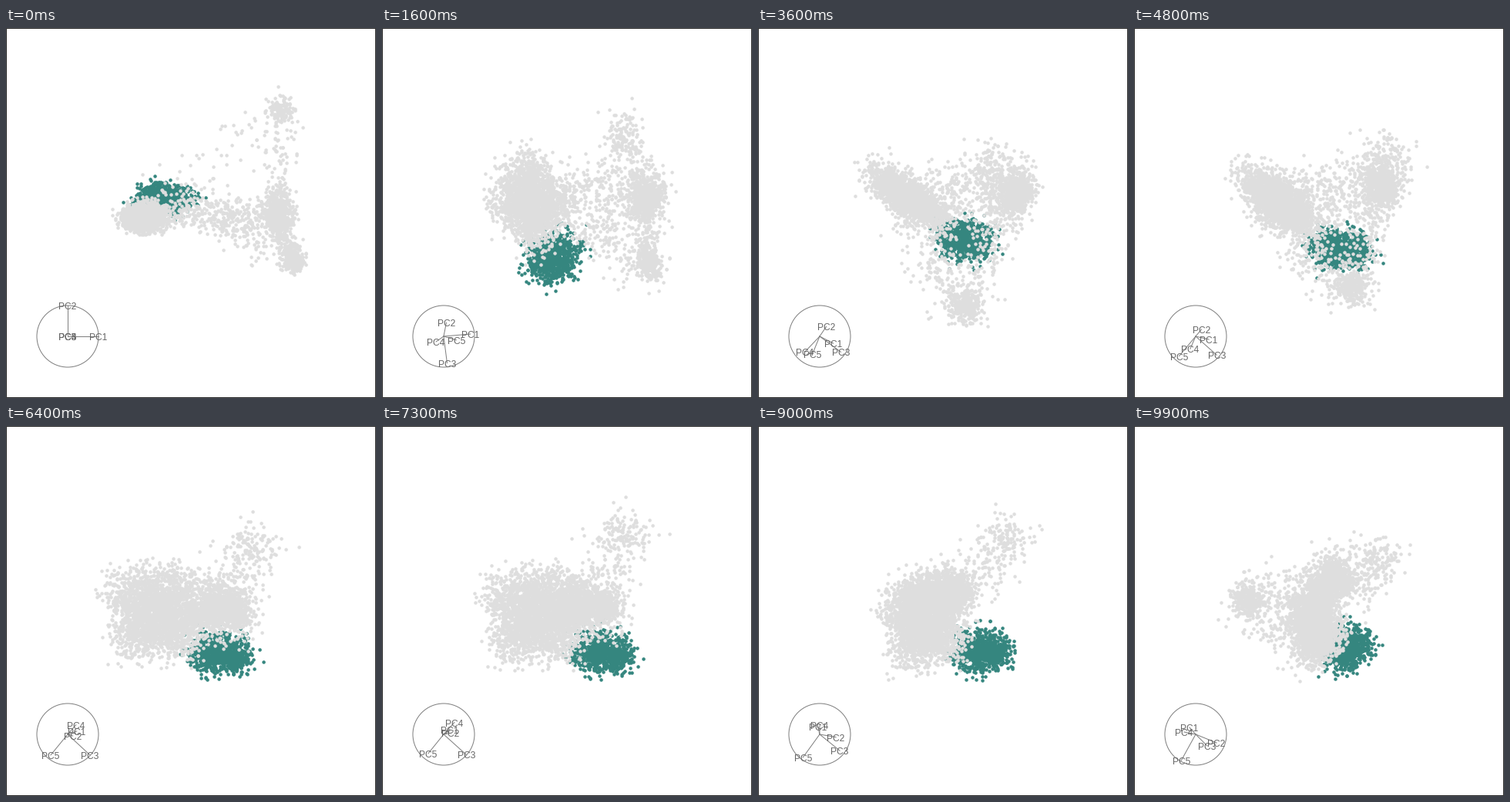
Animation, 480 px wide and 480 px high, one loop 10000 ms. Source, as a matplotlib script:

```python
import matplotlib.pyplot as plt
import numpy as np
from matplotlib.animation import FuncAnimation
from matplotlib.patches import Circle, Rectangle

SIZE, DPI = 480, 96
PX = 72 / DPI
FRAMES, INTERVAL = 100, 100
CENTER = np.array([240, 240])
HUB, RADIUS = np.array([80, 400]), 40
TEAL, PALE, LINE, INK = "#35867f", "#dedede", "#7f7f7f", "#666666"

# The tour pauses for one frame whenever it reaches a target plane.
HOLDS = np.array([15, 31, 43, 57, 74, 92])

# Tour step -> tips of the first four axes in the dial, as complex pixels.
TOUR = {
    0: (40, 40j, 0, 0),
    15: (35 + 3j, 3.5 + 18j, 4.5 - 35j, -10 - 7j),
    29: (18 - 11j, 9 + 14j, 27 - 18.5j, -24 - 22j),
    34: (17.5 - 9j, 8.5 + 12.5j, 27 - 20j, -19 - 20j),
    45: (17 - 4j, 7.5 + 9j, 27 - 24j, -7 - 16j),
    60: (11.5 + 4j, 6.5 - 2j, 28 - 26j, 10.5 + 12j),
    77: (4 + 8j, 11 + 5j, 29.5 - 26j, 16 + 18j),
    93: (-8 + 9j, 27 - 11j, 15 - 15j, -15 + 3j),
}

rng = np.random.default_rng(7)


def orthonormal(m):
    u, _, vt = np.linalg.svd(m, full_matrices=False)
    return u @ vt


def plane(tips):
    """Basis from four tips; the squares of all five must sum to zero."""
    z = np.array(tips, complex)
    last = np.sqrt(-np.sum(z ** 2))
    z = np.append(z, -last if last.imag > 0 else last)
    return orthonormal(np.column_stack([z.real, z.imag]))


def geodesic(a, b, t):
    """Basis a fraction t of the way along the shortest path of planes."""
    u, s, vt = np.linalg.svd(a.T @ b)
    ga, gb = a @ u, b @ vt.T
    angle = np.arccos(np.clip(s, -1, 1))
    side = gb - ga * s
    side /= np.maximum(np.linalg.norm(side, axis=0), 1e-9)
    between = ga * np.cos(t * angle) + side * np.sin(t * angle)
    return between @ orthonormal((1 - t) * u.T + t * vt)


STEPS = list(TOUR)
BASES = [plane(tips) for tips in TOUR.values()]


def basis_at(frame):
    step = frame - np.sum(HOLDS <= frame)
    i = min(np.searchsorted(STEPS, step, side="right") - 1, len(STEPS) - 2)
    t = (step - STEPS[i]) / (STEPS[i + 1] - STEPS[i])
    return geodesic(BASES[i], BASES[i + 1], t)


def cloud(n, corners, width, height, depth):
    """Random mixes of the corner points plus normal noise in five dimensions."""
    mix = rng.dirichlet(np.ones(len(corners)), n)
    noise = rng.normal(size=(n, 5)) * [width, height, depth, depth, depth]
    return mix @ np.array(corners) + noise


def around(center, *arms):
    """Pairs of opposite corners about a center."""
    return [center + sign * np.array(arm) for arm in arms for sign in (1, -1)]


main = np.array([-61, -5, -27, -8, 16])
right = np.array([113, 0, 4, -72, -30])
top = np.array([117, 135, -30, 29, -68])
low = np.array([132, -58, 36, 75, 28])
marked = np.array([-35, 19, 70, 12, 11])

teal = cloud(880, around(marked, [0, 0, 22, 0, -18]), 17, 9, 12)
pale = np.vstack([
    cloud(2200, around(main, [0, 0, 85, 0, 0], [10, 0, 0, -60, 65]), 12, 8, 11),
    cloud(560, around(right, [-3, 0, 9, 28, -8]), 8, 13, 11),
    cloud(110, [top], 7, 10, 17),
    cloud(260, around(low, [6, -10, 0, 4, 0]), 5, 6, 10),
    cloud(330, [main, right], 10, 12, 23),
    cloud(200, [main + 30, low], 10, 14, 20),
    cloud(170, [right, low], 8, 11, 16),
    cloud(95, [right, top], 12, 12, 19),
    cloud(55, [main + 30, top], 18, 22, 22),
])

fig = plt.figure(figsize=(SIZE / DPI, SIZE / DPI), dpi=DPI, facecolor="white")
ax = fig.add_axes([0, 0, 1, 1])
ax.set(xlim=(0, SIZE), ylim=(SIZE, 0))
ax.axis("off")


def dots(color):
    return ax.plot([], [], "o", color=color, ms=4.5 * PX, mew=0)[0]


layers = [(teal, dots(TEAL)), (pale, dots(PALE))]
ax.add_patch(Circle(HUB, RADIUS, fill=False, ec=LINE, lw=PX, zorder=3))
ax.add_patch(Rectangle((0.5, 0.5), SIZE - 1, SIZE - 1, fill=False,
                       ec="#222222", lw=PX, snap=False, zorder=5))
spokes = [ax.plot([], [], color=LINE, lw=PX, zorder=3)[0] for _ in range(5)]
labels = [ax.text(0, 0, f"PC{i + 1}", color=INK, fontsize=12 * PX, zorder=4,
                  family="Liberation Sans", ha="center", va="baseline")
          for i in range(5)]


def update(frame):
    basis = basis_at(frame) * [1, -1]
    for points, artist in layers:
        artist.set_data(*(CENTER + points @ basis).T)
    for tip, spoke, label in zip(HUB + RADIUS * basis, spokes, labels):
        spoke.set_data(*np.array([HUB, tip]).T)
        label.set_position(tip + [0, 5])
    return [artist for _, artist in layers] + spokes + labels


anim = FuncAnimation(fig, update, frames=FRAMES, interval=INTERVAL,
                     repeat=True, repeat_delay=0)
plt.show()
```
